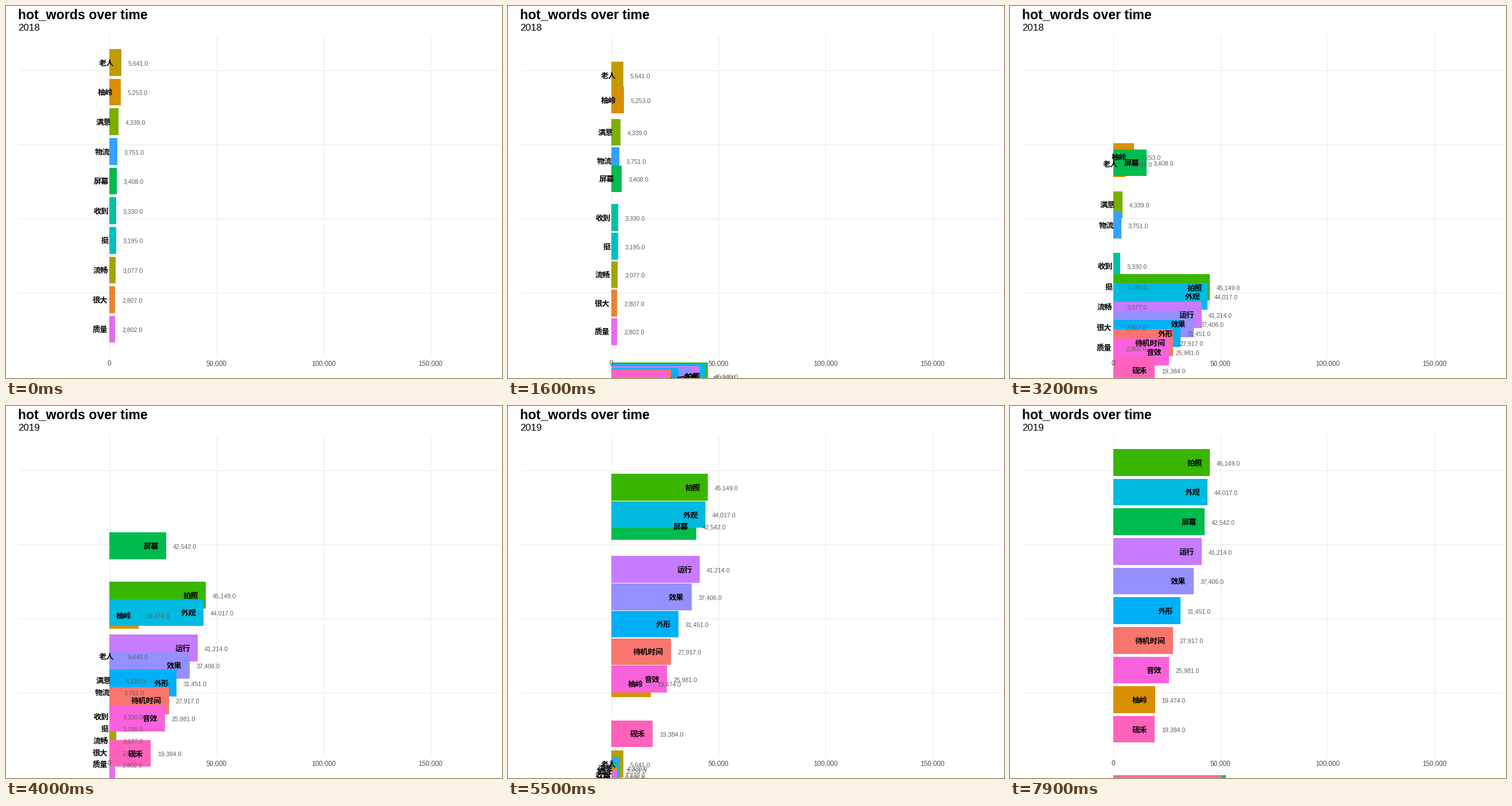
Animation of 864x648 px, one loop 8000 ms. Source, as a matplotlib script:

```python
import matplotlib.pyplot as plt
from matplotlib.animation import FuncAnimation
from matplotlib.patches import Rectangle

W, H, DPI = 864, 648, 100
FRAMES, STEP = 80, 75          # frames in the loop, frames per year
X0, UNIT = 180, 186.5 / 50000  # pixel of zero, pixels per count
TOP, ROW = 98.4, 51.65         # centre of rank 1, distance between ranks
BAR = 0.9 * ROW
OUT = 12                       # rank where bars enter and leave

# name, colour, (rank, value) in 2018, (rank, value) in 2019; drawn in this order
WORDS = [
    ("老人", "#C09B00", (1, 5641), None),
    ("柚岭", "#D89000", (2, 5253), (9, 19474)),
    ("满意", "#7CAE00", (3, 4339), None),
    ("物流", "#35A2FF", (4, 3751), None),
    ("屏幕", "#00BB4E", (5, 3408), (3, 42542)),
    ("收到", "#00C1A3", (6, 3330), None),
    ("挺", "#00BFC4", (7, 3195), None),
    ("流畅", "#A3A500", (8, 3077), None),
    ("很大", "#EA8331", (9, 2807), None),
    ("质量", "#E76BF3", (10, 2802), None),
    ("拍照", "#39B600", None, (1, 45149)),
    ("外观", "#00BAE0", None, (2, 44017)),
    ("运行", "#C77CFF", None, (4, 41214)),
    ("效果", "#9590FF", None, (5, 37406)),
    ("外形", "#00B0F6", None, (6, 31451)),
    ("待机时间", "#F8766D", None, (7, 27917)),
    ("音效", "#FA62DB", None, (8, 25981)),
    ("砚禾", "#FF62BC", None, (10, 19384)),
]
# bars that start to rise after the second year
NEXT = [("#00BF7D", 52600), ("#FF6A98", 50700)]

plt.rcParams["font.family"] = "Liberation Sans"
fig = plt.figure(figsize=(W / DPI, H / DPI), dpi=DPI, facecolor="white")
ax = fig.add_axes([0, 0, 1, 1])
ax.set(xlim=(0, W), ylim=(H, 0))
ax.axis("off")


def text(x, y, s, px, color="black", **kw):
    return ax.text(x, y, s, fontsize=px * 72 / DPI, color=color,
                   va="baseline", **kw)


def bar(color, value, z):
    return ax.add_patch(Rectangle((X0, 0), value * UNIT, BAR, fc=color, lw=0, zorder=z))


def row_y(rank):
    return TOP + ROW * (rank - 1)


def ease(t):
    return 4 * t ** 3 if t < 0.5 else 1 - 4 * (1 - t) ** 3


def mix(a, b, p):
    return a + (b - a) * p


grid = dict(color="#EBEBEB", lw=0.8, zorder=1, solid_capstyle="butt")
for i in range(4):
    x, y = X0 + 186.5 * i, 111.5 + 129.15 * i
    ax.plot([x, x], [50, 611], **grid)
    ax.plot([22, 860], [y, y], **grid)
    text(x, 626, f"{50000 * i:,}", 11.6, "#4D4D4D", ha="center", zorder=6)

text(21, 21.6, "hot_words over time", 23.1, weight="bold")
year = text(21.3, 42.6, "2018", 17)

rows = []
for k, (name, color, old, new) in enumerate(WORDS):
    rows.append((
        bar(color, 0, 2 + k / 100),
        text(0, 0, "", 10.6, "#606060", zorder=4),
        text(0, 0, name, 13.2, ha="right", weight="bold", zorder=5,
             family="Noto Sans CJK JP"),
    ))
rising = [bar(color, value, 3) for color, value in NEXT]


def draw(n):
    t = min(n / STEP, 1)
    p = ease(t)
    late = t > 0.5
    year.set_text("2019" if late else "2018")
    for (box, count, label), (_, _, old, new) in zip(rows, WORDS):
        shown = (old or t > 0) and (new or t < 1)
        for part in (box, count, label):
            part.set_visible(bool(shown))
        a = old or (OUT, new[1])
        b = new or (OUT, old[1])
        y = row_y(mix(a[0], b[0], p))
        width = mix(a[1], b[1], p) * UNIT
        box.set_y(y - BAR / 2)
        box.set_width(width)
        count.set_text(f"{(b if late else a)[1]:,}.0")
        count.set_position((X0 + width + 11.7, y + 4.7))
        label.set_position((X0 + width - 13, y + 5.2))
    lift = ease(max(n - STEP, 0) / STEP)
    for box in rising:
        box.set_visible(n > STEP)
        box.set_y(row_y(mix(OUT, 1, lift)) - BAR / 2)
    return []


anim = FuncAnimation(fig, draw, frames=FRAMES, interval=100,
                     init_func=lambda: draw(0), repeat=True, repeat_delay=0)
plt.show()
```
